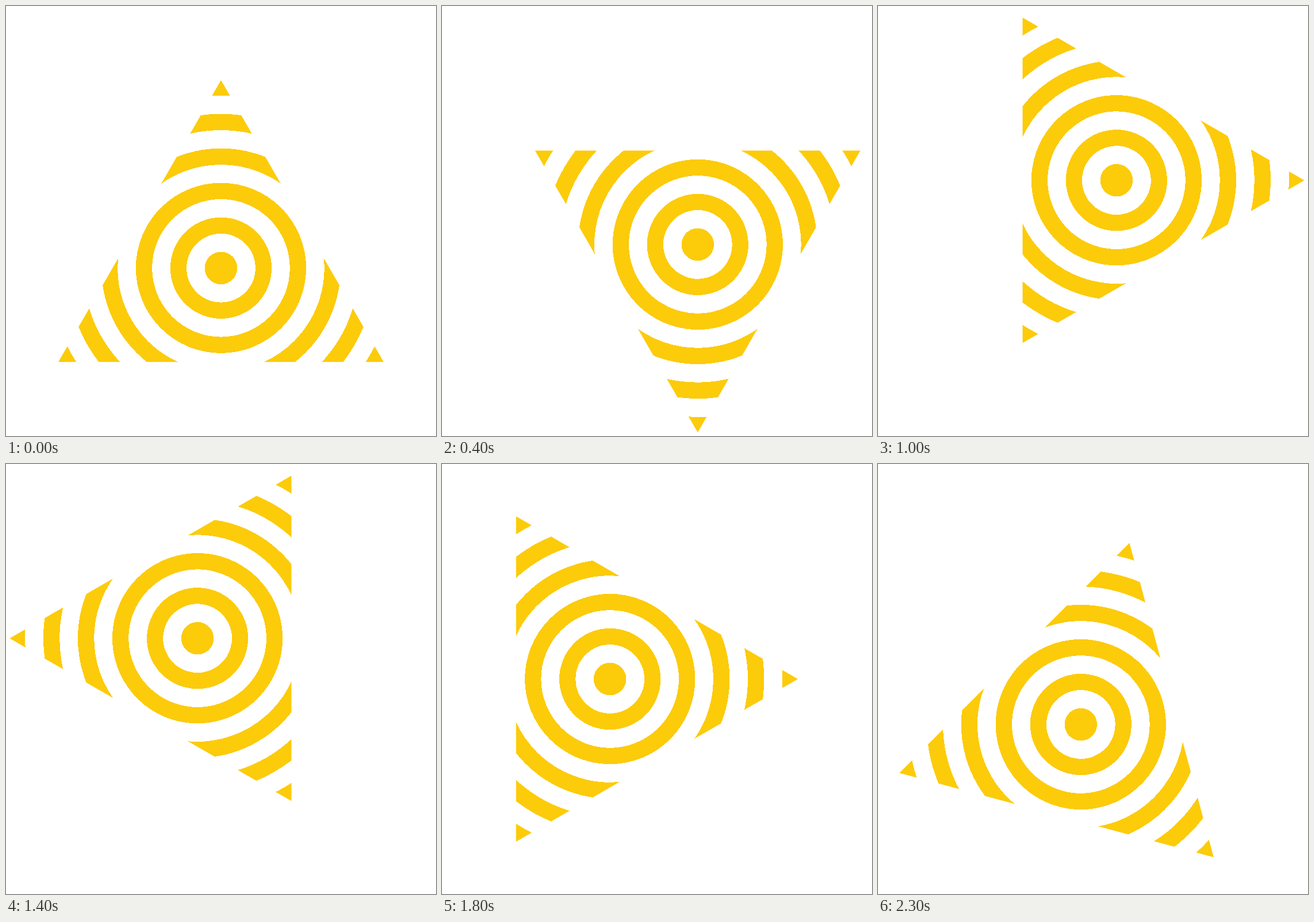
These frames come from a looping animation (748x748 px, 2.4 s). An HTML page:

```html
<!DOCTYPE html>
<html lang="en">
<head>
<meta charset="utf-8">
<title>Rotating ringed triangle</title>
<style>
  html, body { margin: 0; width: 100%; height: 100%; overflow: hidden; background: #fff; }
  svg { display: block; width: 100vw; height: 100vh; shape-rendering: crispEdges; }
</style>
</head>
<body>
<svg viewBox="-374 -374 748 748">
  <clipPath id="triangle"><polygon points="0,-326.8 283,163.4 -283,163.4"/></clipPath>
  <g id="spinner">
    <g id="rings" transform="translate(0 81.8)" clip-path="url(#triangle)"
       fill="none" stroke="#fccb0a" stroke-width="28.3">
      <circle r="28.3" fill="#fccb0a" stroke="none"/>
    </g>
  </g>
</svg>
<script>
  const LOOP = 2400, STEP = 100, GAP = 60, BAND = 28.3;
  const spinner = document.getElementById('spinner');
  const rings = document.getElementById('rings');

  for (let inner = GAP; inner <= 5 * GAP; inner += GAP) {
    const ring = document.createElementNS(rings.namespaceURI, 'circle');
    ring.setAttribute('r', inner - 0.2 + BAND / 2);
    // The outermost band fills the corners completely.
    if (inner === 5 * GAP) {
      ring.setAttribute('r', inner + GAP / 2);
      ring.setAttribute('stroke-width', GAP);
    }
    rings.append(ring);
  }

  const start = performance.now();
  function draw() {
    const time = (performance.now() - start) % LOOP;
    const angle = -360 * Math.floor(time / STEP) * STEP / LOOP;
    spinner.setAttribute('transform', `rotate(${angle})`);
    requestAnimationFrame(draw);
  }
  draw();
</script>
</body>
</html>
```
